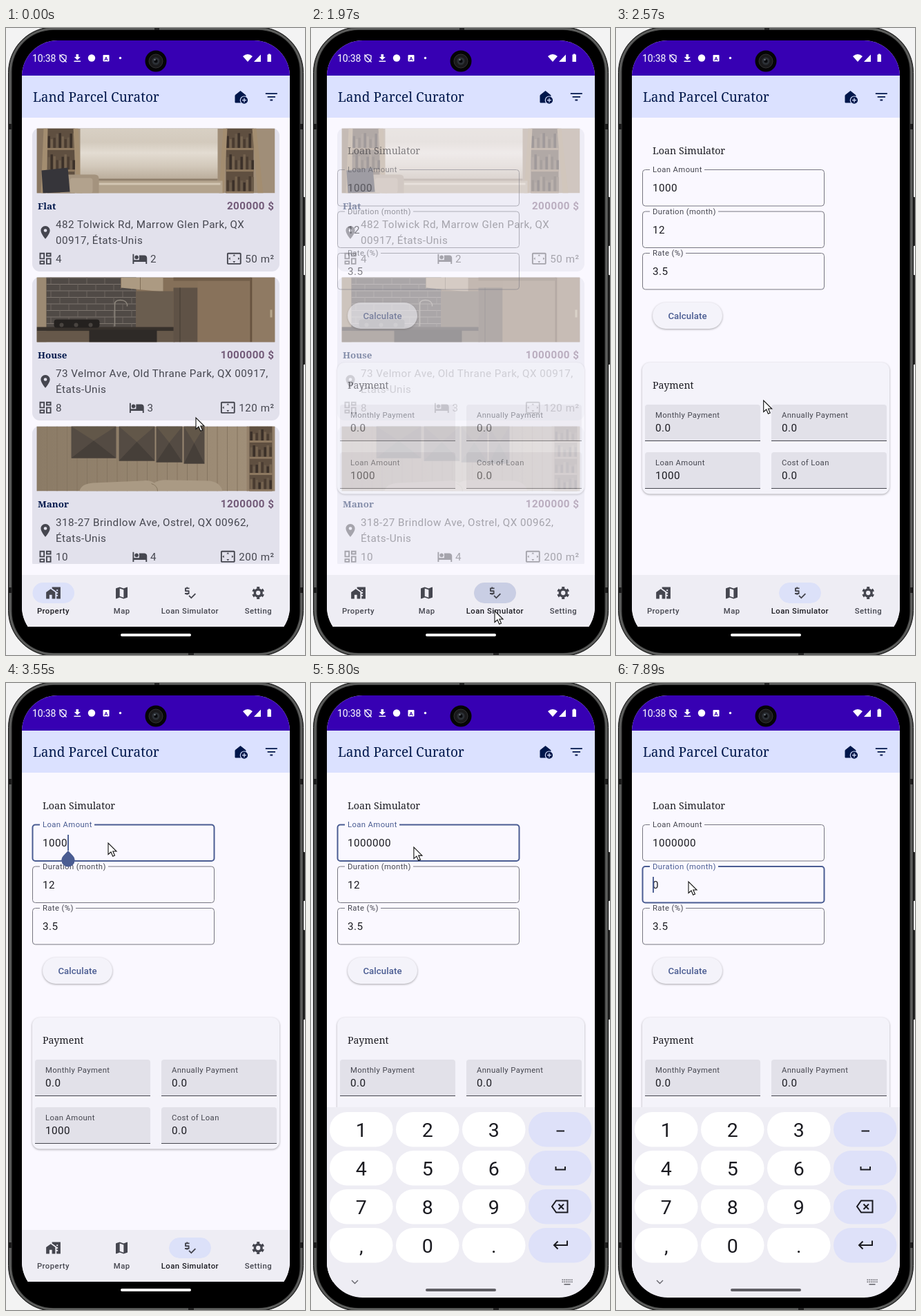
Recreate the animation shown at these times as an HTML page. Size 433 px wide and 909 px high, loop 8000 ms.

```html
<!DOCTYPE html>
<html lang="en">
<head>
<meta charset="utf-8">
<title>Loan simulator demo</title>
<style>
  html, body { margin: 0; width: 100%; height: 100%; overflow: hidden; background: #f3f3f3; }
  svg { display: block; width: 100vw; height: 100vh; }
  text { font: 15.2px Roboto, sans-serif; letter-spacing: .48px; fill: #45464f; white-space: pre; }
  .serif { font: 14.2px "Noto Serif", serif; letter-spacing: .02px; fill: #1b1b21; }
  .title { font-size: 19px; fill: #00174b; }
  .kind { font-weight: 600; font-size: 13.4px; fill: #00174b; }
  .price { font-weight: 700; fill: #725a78; }
  .small { font-size: 11.3px; letter-spacing: .38px; }
  .tab { font-size: 11.3px; font-weight: 500; }
  .value { fill: #1b1b21; }
  .key { font-size: 28.5px; letter-spacing: 0; fill: #1b1b21; }
  .raised { filter: drop-shadow(0 1.5px 1.5px #0005); }
  .line { fill: none; stroke: #1b1b21; stroke-width: 2; }
</style>
</head>
<body>
<svg id="stage" viewBox="0 0 433 909"></svg>
<script>
const LOOP = 8000, BLUE = '#4a5c92', INK = '#45464f', NAVY = '#00174b', PILL = '#dce1f9';

const rect = (x, y, w, h, fill, rx = 0, extra = '') =>
  `<rect x="${x}" y="${y}" width="${w}" height="${h}" fill="${fill}" rx="${rx}" ${extra}/>`;
const circle = (x, y, r, fill, extra = '') =>
  `<circle cx="${x}" cy="${y}" r="${r}" fill="${fill}" ${extra}/>`;
const path = (d, fill, extra = '') => `<path d="${d}" fill="${fill}" ${extra}/>`;
const text = (x, y, s, cls = '', extra = '') => `<text x="${x}" y="${y}" class="${cls}" ${extra}>${s}</text>`;
const group = (x, y, body) => `<g transform="translate(${x} ${y})">${body}</g>`;
const repeat = (n, fn) => Array.from({ length: n }, (_, i) => fn(i)).join('');
const END = 'text-anchor="end"', MID = 'text-anchor="middle"';

// 24-unit icons
const icons = {
  rooms: 'M19 5v2h-4V5h4M9 5v6H5V5h4m10 8v6h-4v-6h4M9 17v2H5v-2h4M21 3h-8v6h8V3zM11 3H3v10h8V3zm10 8h-8v10h8V11zm-10 4H3v6h8v-6z',
  bed: 'M7 13c1.66 0 3-1.34 3-3S8.66 7 7 7s-3 1.34-3 3 1.34 3 3 3zm12-6h-8v7H3V5H1v15h2v-3h18v3h2v-9c0-2.21-1.79-4-4-4z',
  area: 'M12 5.5L10 8h4zM18 10v4l2.5-2zM6 10l-2.5 2L6 14zM14 16h-4l2 2.5zM21 3H3c-1.1 0-2 .9-2 2v14c0 1.1.9 2 2 2h18c1.1 0 2-.9 2-2V5c0-1.1-.9-2-2-2zm0 16H3V5h18z',
  pin: 'M12 2C8.13 2 5 5.13 5 9c0 5.25 7 13 7 13s7-7.75 7-13c0-3.87-3.13-7-7-7zm0 9.5a2.5 2.5 0 0 1 0-5 2.5 2.5 0 0 1 0 5z',
  homes: 'M1 11v10h5v-6h4v6h5V11L8 6zM10 3v2l7 5v1h2v2h-2v2h2v2h-2v4h6V3H10zm9 6h-2V7h2v2z',
  map: 'M20.5 3L15 5.1 9 3 3.4 4.9 3 5.4V20.5l.5.5L9 18.9l6 2.1 5.6-1.9.4-.5V3.5zM15 19l-6-2.1V5l6 2.1z',
  loan: 'M11 13V9c0-.55-.45-1-1-1H6V6h5V4H8.5V3h-2v1H5c-.55 0-1 .45-1 1v4c0 .55.45 1 1 1h4v2H4v2h2.5v1h2v-1H10c.55 0 1-.45 1-1zm8.6-.5l-5.7 5.7-2.8-2.9-1.4 1.5 4.2 4.2 7.1-7.1z',
  filter: 'M10 18h4v-2h-4v2zM3 6v2h18V6H3zm3 7h12v-2H6v2z'
};
const icon = (name, x, y, fill = INK) => path(icons[name], fill, `transform="translate(${x} ${y}) scale(.944)"`);
const gear = (x, y) => group(x, y,
  circle(0, 0, 4.9, 'none', `stroke="${INK}" stroke-width="3.5"`) +
  circle(0, 0, 7.3, 'none', `stroke="${INK}" stroke-width="3.4" pathLength="12" stroke-dasharray="1" transform="rotate(15)"`));

// Room pictures, 345 by 94
const shelf = (x, w, rows, wood) => rect(x, 0, w, 94, '#5f4f40') + repeat(rows, r => {
  const step = 94 / rows;
  return rect(x, (r + 1) * step - 3, w, 3, wood) + repeat(Math.floor(w / 4), i => {
    const h = step * (.55 + .15 * Math.sin(i * 5 + r * 3));
    return rect(x + 1 + i * 4, (r + 1) * step - 3 - h, 3.4, h, ['#3b3029', '#6b5b4a', '#4a3c31', '#75634f'][(i * 3 + r) % 4]);
  });
});
const rooms = [
  rect(0, 0, 345, 94, '#a08e78') + rect(0, 0, 14, 94, '#8a7762') + shelf(15, 40, 3, '#8f795f') + shelf(274, 40, 3, '#8f795f') +
  path('M10 0h6L14 94H6zM53 0h7l6 94h-8zM270 0h6l-5 94h-7zM312 0h6l10 94h-8z', '#a38d70') +
  rect(63, 0, 199, 79, 'url(#window)') + rect(63, 73, 199, 3, '#8f7f6c') + rect(63, 76, 206, 18, '#b3a38d') + rect(90, 79, 176, 3, '#d2c5b2') +
  path('M34 94V73q0-6 8-6h42q6 0 6 6v21z', '#a4937e') + rect(48, 72, 33, 22, '#b2a28d', 4) + path('M7 61l38-4 3 35-39 2z', '#36353a'),

  rect(0, 0, 345, 94, '#857059') + rect(0, 0, 14, 94, '#9c8a73') + rect(14, 0, 130, 74, '#504a46') +
  repeat(8, r => rect(14, r * 9.5, 130, 1, '#7d756e') + repeat(5, i => rect(20 + i * 26 + r % 2 * 13, r * 9.5, 1, 9.5, '#6d655f'))) +
  path('M65 0h118v21L122 15V0z', '#ac9a82') + path('M122 0v16M150 0v19', 'none', 'stroke="#806e59"') + rect(144, 20, 54, 54, '#6a5d4f') +
  path('M113 71V39q0-6 8-6t10 6v3', 'none', 'stroke="#8d867c" stroke-width="1.5"') +
  rect(0, 72, 200, 6, '#37312c') + rect(0, 78, 200, 16, '#66584a') + rect(76, 76, 98, 18, '#2e2a27') +
  rect(25, 61, 66, 12, '#24211f', 4) + repeat(3, i => circle(36 + i * 21, 69, 3, '#494440')) +
  rect(198, 15, 35, 79, '#5f5246') + rect(207, 15, 1, 79, '#443a32') + rect(233, 4, 76, 90, '#88725b') + rect(309, 0, 3, 94, '#67533f') +
  rect(312, 0, 33, 94, '#8f7a63') + rect(338, 47, 3, 11, '#b7a78d') + rect(198, 0, 112, 5, '#715d49'),

  rect(0, 0, 345, 94, 'url(#planks)') + repeat(24, i => rect(i * 14.5, 0, 1, 94, '#857561')) +
  [[50, 65, 46], [119, 52, 50], [173, 38, 52], [213, 30, 54]].map(([x, w, h]) =>
    rect(x, 0, w, h, '#544b43') + path(`M${x} 0h${w}l${-w / 2} ${h * .45}z`, '#625749') +
    path(`M${x} ${h}l${w / 2} ${-h * .55} ${w / 2} ${h * .55}z`, '#463f39')).join('') +
  path('M62 94q2-11 20-12l70-3q12-2 18 3 8-5 22-4l58 1q16 2 19 15z', '#aa9a84') + path('M166 83q9 3 9 11', 'none', 'stroke="#85765f"') +
  rect(304, 0, 41, 94, '#93806a') + shelf(308, 33, 4, '#8d7860')
];

const homes = [
  ['Flat', '200000 $', '482 Tolwick Rd, Marrow Glen Park, QX', '00917, États-Unis', 4, 2, '50 m²', 0, 320],
  ['House', '1000000 $', '73 Velmor Ave, Old Thrane Park, QX 00917,', 'États-Unis', 8, 3, '120 m²', -4.5, 311],
  ['Manor', '1200000 $', '318-27 Brindlow Ave, Ostrel, QX 00962,', 'États-Unis', 10, 4, '200 m²', 0, 311]
];
const card = ([kind, price, line1, line2, roomCount, beds, size, shift, areaX], i) => group(0, 145 + i * 216,
  rect(38, 0, 358, 208, '#e2e1ec', 11) +
  `<svg x="44.5" y=".5" width="345" height="94">${rooms[i]}</svg>` +
  text(46, 118, kind, 'serif kind') + text(388.5, 118, price, 'price', END) +
  icon('pin', 45.7, 140) + text(72, 145, line1) + text(72, 168, line2) +
  icon('rooms', 45.7, 178) + text(72, 195, roomCount) +
  icon('bed', 182.5 + shift, 178) + text(209 + shift, 195, beds) +
  icon('area', areaX - 1, 178) + text(388.5, 195, size, '', END));

const outlined = (id, y, label, value, gapEnd) =>
  path(`M49 ${y}H42.5a4 4 0 0 0-4 4v44.5a4 4 0 0 0 4 4H297.5a4 4 0 0 0 4-4v-44.5a4 4 0 0 0-4-4H${gapEnd}`, 'none', `id="${id}Line"`) +
  text(53, y + 3.7, label, 'small', `id="${id}Label"`) + text(53, y + 31.7, value, 'value', `id="${id}Value"`);
const filled = (x, y, label, value) =>
  path(`M${x} ${y + 53}v-49a4 4 0 0 1 4-4h159a4 4 0 0 1 4 4v49z`, '#e2e1e9') + rect(x, y + 52, 167, 1, INK) +
  text(x + 15, y + 19, label, 'small') + text(x + 15, y + 39, value, 'value');
const loanScreen =
  text(53, 183, 'Loan Simulator', 'serif') +
  outlined('amount', 205.5, 'Loan Amount', '1000', 128) +
  outlined('duration', 266, 'Duration (month)', '12', 148) +
  outlined('rate', 326.5, 'Rate (%)', '3.5', 101) +
  rect(53, 398, 101, 38, '#f4f3fa', 19, 'class="raised"') +
  text(103.5, 422, 'Calculate', '', `${MID} style="font-weight:500;font-size:13.2px;letter-spacing:.1px;fill:${BLUE}"`) +
  rect(38, 485, 358, 190.5, '#f4f3fa', 11, 'class="raised"') + text(53, 523, 'Payment', 'serif') +
  filled(42, 546, 'Monthly Payment', '0.0') + filled(225, 546, 'Annually Payment', '0.0') +
  filled(42, 615, 'Loan Amount', '1000') + filled(225, 615, 'Cost of Loan', '0.0');

const tab = (id, cx, label, glyph) => glyph + text(cx, 849, label, 'tab', `id="${id}Tab" ${MID}`);
const tabBar = rect(23, 793, 388, 75, '#eeedf4') +
  rect(38.5, 804, 60.5, 30, PILL, 15, 'id="homePill"') +
  `<g clip-path="url(#pill)">${rect(236, 804, 61, 30, PILL, 15, 'id="loanPill"')}${circle(266, 819, 8, INK, 'id="ripple"')}</g>` +
  tab('home', 68.5, 'Property', icon('homes', 57.2, 807.7)) + tab('map', 167.7, 'Map', icon('map', 156.2, 807.7)) +
  tab('loan', 266.4, 'Loan Simulator', icon('loan', 255.2, 807.7)) + tab('setting', 365.4, 'Setting', gear(365.2, 819));

const keyX = c => 27 + c * 96, keyY = r => 622 + r * 56;
const keyboard = rect(23, 615, 388, 300, '#eeedf4') +
  repeat(16, i => rect(keyX(i % 4), keyY(i >> 2), 91.5, 50.5, i % 4 < 3 ? '#fff' : '#dee1f9', 25.2)) +
  [...'123456789,0.'].map((k, i) => text(keyX(i % 3) + 45.8, keyY(Math.floor(i / 3)) + 36, k, 'key', MID)).join('') +
  path('M355.5 649.5h11.5M354.5 701v4.5h13.5v-4.5', 'none', 'class="line"') +
  path('M355 750.5h16.5v17H355l-6-8.5zM358.5 755.5l7.5 7.5m0-7.5l-7.5 7.5', 'none', 'class="line"') +
  path('M371 808.5v6.5h-18.5m5-5.5l-5.5 5.5 5.5 5.5', 'none', 'class="line"') +
  path('M59 866l4.5 4.5 4.5-4.5', 'none', 'stroke="#66666d" stroke-width="1.4"') +
  repeat(12, i => rect(363.5 + i % 6 * 2.7, 864.5 + Math.floor(i / 6) * 3, 1.6, 1.6, '#66666d')) + rect(366.5, 871, 9, 1.6, '#66666d');

const statusBar = rect(23, 18, 388, 51, '#3700b3') +
  text(38, 48.5, '10:38', '', 'style="fill:#fff;font-size:14px;letter-spacing:-.1px"') +
  path('M82.5 38.5l4.5 1.7v3.5q0 4-4.5 5.5-4.5-1.5-4.5-5.5v-3.5zM77.5 38.5l10 11', 'none', 'stroke="#fff" stroke-width="1.3"') +
  path('M101.5 38h3.5v4h2.8l-4.5 4.5-4.5-4.5h2.7zM98.5 47.5h9.6v1.6h-9.6z', '#fff') +
  circle(124, 43.5, 5.2, '#fff') + rect(140.5, 39, 9, 9.5, '#fff', 1) +
  text(145, 46.7, 'A', '', `${MID} style="fill:#3700b3;font-size:8px;font-weight:700;letter-spacing:0"`) + circle(165.5, 43.5, 1.7, '#fff') +
  path('M343 41q7-6 14 0l-7 8zM359 49h10V38.5zM378.5 38.5h1.5v-1h2.5v1h1.5v10.5h-5.5z', '#fff');

const appBar = rect(23, 69, 388, 61, '#dbe1ff') + text(39, 106.5, 'Land Parcel Curator', 'serif title') +
  path('M332 108V97.5l7.500-6 7.500 6V108z'.replaceAll('.500', '.5'), NAVY, `stroke="${NAVY}" stroke-linejoin="round"`) +
  circle(345, 104.7, 5.7, NAVY, 'stroke="#dbe1ff" stroke-width="1.2"') +
  path('M345 101.7v6m-3-3h6', 'none', 'stroke="#dbe1ff" stroke-width="1.3"') + icon('filter', 373, 88.5, NAVY);

const phone = rect(0, 0, 433, 909, '#f3f3f3') +
  rect(429, 245, 4, 71, '#222', 1) + rect(429, 358, 4, 130, '#222', 1) +
  rect(3.5, -1.5, 427, 912, '#4c4d4c', 66, 'stroke="#111"') +
  rect(6, 1, 422, 907, 'none', 63, 'stroke="#6f706e"') + rect(8.5, 3, 417, 903, '#000', 60) +
  [3, 426].map(x => rect(x, 139, 5, 8, '#1c1c1c') + rect(x, 811, 5, 8, '#1c1c1c')).join('') +
  rect(215, 0, 7, 3, '#222') + rect(264, 906, 8, 3, '#222');
const camera = circle(217, 48, 15.5, '#050505') + circle(217, 48, 10, '#1a1a1c', 'stroke="#333"') +
  circle(217, 48, 5.5, '#2c3036') + circle(217, 48, 2.5, '#08090c') + circle(215.5, 46, 1.2, '#6d747d');

const stage = document.getElementById('stage');
stage.innerHTML = `<defs>
  <clipPath id="screen">${rect(23, 18, 388, 873, '#000', 52)}</clipPath>
  <clipPath id="list">${rect(23, 130, 388, 647, '#000')}</clipPath>
  <clipPath id="pill">${rect(236, 804, 61, 30, '#000', 15)}</clipPath>
  <linearGradient id="window" x2="0" y2="1"><stop stop-color="#d8d0c4"/><stop offset=".25" stop-color="#d3cabd"/>
    <stop offset=".45" stop-color="#e3dcd2"/><stop offset=".7" stop-color="#d2c8ba"/><stop offset="1" stop-color="#b3a592"/></linearGradient>
  <linearGradient id="planks"><stop stop-color="#8b7b66"/><stop offset=".7" stop-color="#9b8a74"/><stop offset="1" stop-color="#a3927b"/></linearGradient></defs>
  ${phone}<g clip-path="url(#screen)">
    ${rect(23, 18, 388, 850, '#faf8ff')}
    <g id="homeScreen" clip-path="url(#list)">${homes.map(card).join('')}</g>
    <g id="loanScreen">${loanScreen}</g>
    ${statusBar}${appBar}${tabBar}
    ${rect(0, 0, 1.9, 23, BLUE, 0, 'id="caret"')}
    ${path('M0 0l6.8 7.2a9.6 9.6 0 1 1-13.6 0z', BLUE, 'id="handle"')}
    <g id="keyboard">${keyboard}</g>${rect(166, 878, 102, 4, '#fff', 2, 'id="homeBar"')}
  </g>${camera}
  ${path('M0 0V16.5L4 13l2.7 6.2 2.8-1.2L6.8 12H12z', '#fff', 'id="cursor" stroke="#111" stroke-width="1.1"')}`;

const $ = Object.fromEntries([...stage.querySelectorAll('[id]')].map(e => [e.id, e]));
const set = (e, attrs) => { for (const k in attrs) e.setAttribute(k, attrs[k]); };
const show = (e, on) => { e.style.display = on ? '' : 'none'; };
const clamp = v => Math.max(0, Math.min(1, v));
const within = (t, ...spans) => spans.some(([a, b]) => t >= a && t < b);

// time, x, y of the pointer tip
const route = [[0, 275, 565], [420, 275, 565], [700, 302, 690], [1010, 339, 828], [1150, 339, 828], [1210, 335, 828], [1350, 266, 845],
  [1990, 266, 845], [2200, 262, 790], [2570, 214, 542], [2720, 170, 247], [3050, 148, 232], [5760, 148, 232], [5800, 149, 238], [6300, 105, 288], [LOOP, 105, 288]];
function pointer(t) {
  const i = route.findIndex(p => p[0] > t), [t0, x0, y0] = route[i - 1], [t1, x1, y1] = route[i];
  const k = (t - t0) / (t1 - t0);
  return `translate(${x0 + (x1 - x0) * k} ${y0 + (y1 - y0) * k})`;
}

function focus(id, on) {
  set($[id + 'Line'], { stroke: on ? BLUE : '#767680', 'stroke-width': on ? 2 : 1 });
  $[id + 'Label'].style.fill = on ? BLUE : '';
}

function draw(t) {
  const onLoan = t >= 1970, fade = onLoan ? clamp(.53 + (t - 1970) / 700) : 0;
  set($.homeScreen, { opacity: 1 - fade });
  set($.loanScreen, { opacity: fade });
  show($.homePill, !onLoan);
  show($.loanPill, onLoan);
  $.homeTab.style.fill = onLoan ? '' : '#1b1b21';
  $.loanTab.style.fill = onLoan ? '#1b1b21' : '';
  set($.ripple, { r: 8 + 26 * clamp((t - 1550) / 280), opacity: t < 1550 ? 0 : .12 * (1 - clamp((t - 1980) / 350)) });

  const amount = '1000' + '0'.repeat([4610, 4870, 5270].filter(s => t >= s).length);
  const duration = t < 7430 ? '12' : t < 7890 ? '1' : '0';
  $.amountValue.textContent = amount;
  $.durationValue.textContent = duration;
  const second = t >= 6380;
  focus('amount', t >= 3340 && !second);
  focus('duration', second);
  focus('rate', false);

  const length = second ? (duration === '0' ? 0 : duration.length) : amount.length;
  const x = 53.9 + 9.02 * length, y = second ? 281 : 220;
  set($.caret, { x: x - .9, y });
  show($.caret, within(t, [3340, 3680], [3840, 4340], [4610, 5780], [6450, 6950], [7430, LOOP]));
  set($.handle, { transform: `translate(${x} ${y + 23})` });
  show($.handle, within(t, [3480, 4610], [6450, 7430]));

  show($.keyboard, t >= 3680);
  set($.keyboard, { transform: `translate(0 ${t < 4010 ? 276 * Math.exp((3630 - t) / 44) : 0})` });
  set($.homeBar, { fill: t < 3880 ? '#fff' : '#5f5e64' });
  set($.cursor, { transform: pointer(t) });
}

(function tick() {
  draw(performance.now() % LOOP);
  requestAnimationFrame(tick);
})();
</script>
</body>
</html>
```
